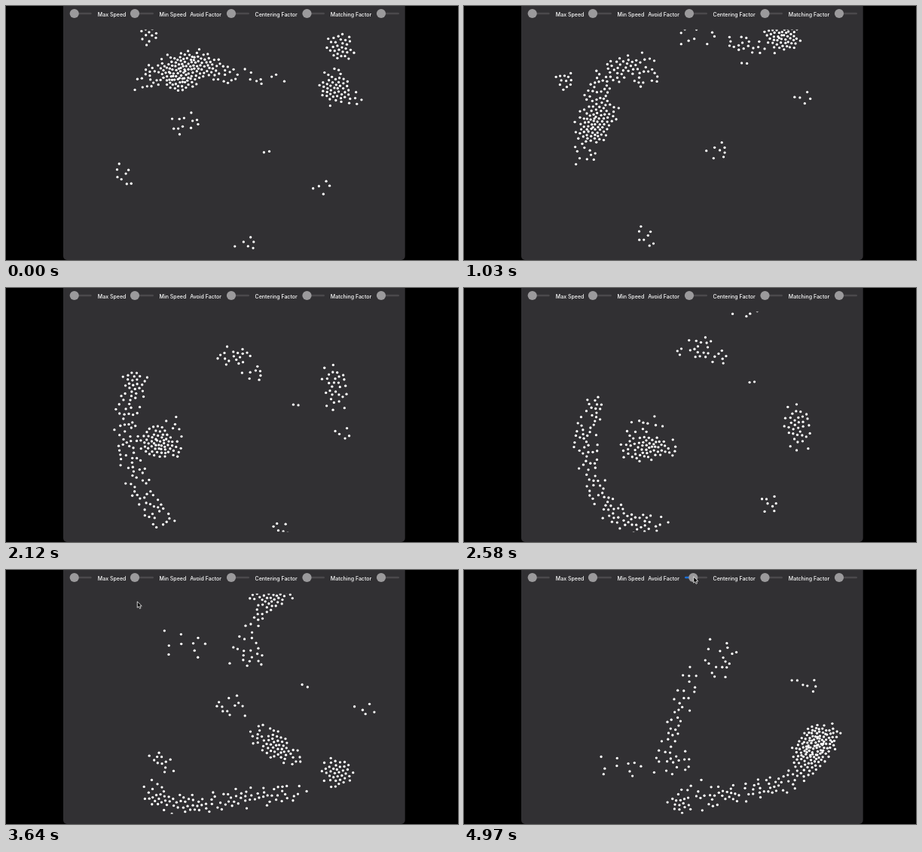
Animation, 600 px wide and 338 px high, one loop 5000 ms. Source, as an HTML page:

```html
<!DOCTYPE html>
<html lang="en">
<head>
<meta charset="utf-8">
<title>Boids</title>
<style>
html, body { margin: 0; width: 100%; height: 100%; overflow: hidden; background: #000; }
svg { display: block; width: 100vw; height: 100vh; }
text { font: 500 7px Inter, "Liberation Sans", sans-serif; fill: #fff; }
</style>
</head>
<body>
<svg id="stage" viewBox="0 0 600 338">
  <defs><clipPath id="area"><rect x="76" y="31.5" width="454" height="293"/></clipPath></defs>
  <rect width="600" height="338" fill="#000"/>
  <rect x="76" y="-10" width="453.7" height="348" rx="5" fill="#313033"/>
  <g id="bar"></g>
  <g id="birds" clip-path="url(#area)" fill="#fff"></g>
  <path id="cursor" d="M0 0V8.2L1.9 6.5L3.2 9.4L4.7 8.7L3.4 5.9H6Z" fill="#000" stroke="#fff" stroke-width=".8" stroke-linejoin="round"/>
</svg>
<script>
const LOOP = 5000, FRAMES = 150, GAP = 6;
const $ = id => document.getElementById(id);

function add(parent, tag, attrs, text) {
  const el = document.createElementNS("http://www.w3.org/2000/svg", tag);
  for (const k in attrs) el.setAttribute(k, attrs[k]);
  if (text) el.textContent = text;
  parent.append(el);
  return el;
}

let seed = 11;
function rnd() {
  seed = (seed * 16807) % 2147483647;
  return seed / 2147483647;
}

// Toolbar
function slider(x, width) {
  const line = { x, y: 8.8, height: 2.4, rx: 1.2 };
  add($("bar"), "rect", { ...line, width, fill: "#4b494c" });
  const fill = add($("bar"), "rect", { ...line, width: 0, fill: "#1a6fd8" });
  const knob = add($("bar"), "circle", { cx: x + 6, cy: 10, r: 6.1, fill: "#9b9a9c" });
  return { x, fill, knob };
}
const label = (x, s) => add($("bar"), "text", { x, y: 13.5 }, s);

slider(84.7, 29);
label(121.8, "Max Speed");
slider(165, 31);
label(203.6, "Min Speed");
label(244.2, "Avoid Factor");
const avoid = slider(293, 30);
label(330.6, "Centering Factor");
slider(393.5, 29.5);
label(430.8, "Matching Factor");
slider(492, 30);

// A flock flies one waypoint per second from second t0. Each bird trails the
// leader by up to lag seconds and keeps its own place in an rx by ry oval.
const birds = [];
function flock(n, rx, ry, lag, t0, ...way) {
  for (let i = 0; i < n; i++) {
    const a = i * 2.4 + rnd(), d = Math.sqrt(rnd());
    birds.push({
      way, start: t0 + lag * (i + rnd()) / n,
      dx: rx * d * Math.cos(a), dy: ry * d * Math.sin(a),
      el: add($("birds"), "circle", { r: 1.65 })
    });
  }
}

// Left swarm
flock(100, 17, 14, 1.9, -2, [288, 92], [245, 74], [182, 105], [161, 205],
  [205, 306], [310, 304], [428, 282], [488, 214]);
flock(58, 18, 15, .5, -1, [265, 92], [222, 100], [172, 172], [214, 212],
  [322, 212], [412, 264], [486, 210]);
flock(12, 22, 12, .3, 0, [238, 148], [240, 95], [215, 190], [280, 165], [308, 215], [300, 320]);
flock(12, 11, 11, .3, 0, [182, 46], [130, 105], [170, 124], [180, 215], [240, 288], [295, 315]);

// Right swarm
flock(18, 22, 9, .4, 0, [432, 105], [360, 45], [300, 93], [340, 43], [348, 47], [338, 143]);
flock(30, 17, 16, .45, 0, [440, 52], [425, 44], [438, 145], [450, 250], [432, 278], [480, 225]);
flock(34, 20, 20, .4, 0, [432, 92], [414, 22]);
flock(16, 22, 13, .5, -1, [458, 98], [290, 88], [330, 10]);

// Flocks that come in from above
flock(42, 15, 9, 1.3, 2, [400, 15], [340, 55], [290, 172], [262, 274]);
flock(10, 40, 9, .2, 3, [250, 15], [236, 166], [210, 275]);

// Small parties
flock(8, 12, 12, .15, 0, [162, 232], [248, 312], [362, 325], [435, 252], [425, 275], [470, 225]);
flock(8, 16, 10, .15, 0, [320, 310], [337, 185], [328, 115], [342, 86], [315, 155], [285, 268]);
flock(2, 4, 4, .05, 0, [346, 191], [372, 75], [384, 155], [382, 102], [408, 182], [440, 144]);
flock(5, 14, 11, .1, 0, [420, 235], [450, 120], [447, 192], [432, 172], [500, 190], [455, 150]);

// Smooth curve through the waypoints, straight on beyond both ends
function fly(way, t, k) {
  const last = way.length - 1;
  const p = i => i < 0 ? way[0][k] + i * (way[1][k] - way[0][k])
    : i > last ? way[last][k] + (i - last) * (way[last][k] - way[last - 1][k])
    : way[i][k];
  const i = Math.floor(t), f = t - i, a = p(i - 1), b = p(i), c = p(i + 1), d = p(i + 2);
  return b + f / 2 * (c - a + f * (2 * a - 5 * b + 4 * c - d + f * (3 * (b - c) + d - a)));
}

// Birds that come too close push each other away
function separate() {
  for (let i = 0; i < birds.length; i++) for (let j = 0; j < i; j++) {
    const a = birds[i], b = birds[j], dx = a.x - b.x, dy = a.y - b.y;
    const d = Math.hypot(dx, dy);
    if (d >= GAP || d === 0) continue;
    const push = .4 * (GAP - d) / d;
    a.x += dx * push; a.y += dy * push;
    b.x -= dx * push; b.y -= dy * push;
  }
}

const ease = (t, a, b) => {
  const f = Math.max(0, Math.min(1, (t - a) / (b - a)));
  return f * f * (3 - 2 * f);
};

function drawBirds(t) {
  for (const b of birds) {
    b.x = fly(b.way, t / 1000 - b.start, 0) + b.dx;
    b.y = fly(b.way, t / 1000 - b.start, 1) + b.dy;
  }
  for (let k = 0; k < 4; k++) separate();
  for (const b of birds) {
    b.el.setAttribute("cx", b.x.toFixed(2));
    b.el.setAttribute("cy", b.y.toFixed(2));
  }
}

function drawPointer(t) {
  const drag = 5.3 * ease(t, 4720, 4960);
  avoid.knob.setAttribute("cx", avoid.x + 6 + drag);
  avoid.fill.setAttribute("width", drag > .2 ? 6 + drag : 0);

  const come = ease(t, 3430, 3860);
  const x = 84 + 196.5 * come + 19 * ease(t, 4220, 4600) + drag;
  const y = 70 - 61 * come;
  $("cursor").setAttribute("transform", `translate(${x.toFixed(2)} ${y.toFixed(2)})`);
  $("cursor").setAttribute("visibility", t < 3430 ? "hidden" : "visible");
}

let shown = -1;
function draw(ms) {
  const n = Math.floor(ms * FRAMES / LOOP);
  if (n === shown) return;
  shown = n;
  drawBirds(n * LOOP / FRAMES);
  drawPointer(n * LOOP / FRAMES);
}

const start = performance.now();
function tick() {
  draw((performance.now() - start) % LOOP);
  requestAnimationFrame(tick);
}
draw(0);
requestAnimationFrame(tick);
</script>
</body>
</html>
```
